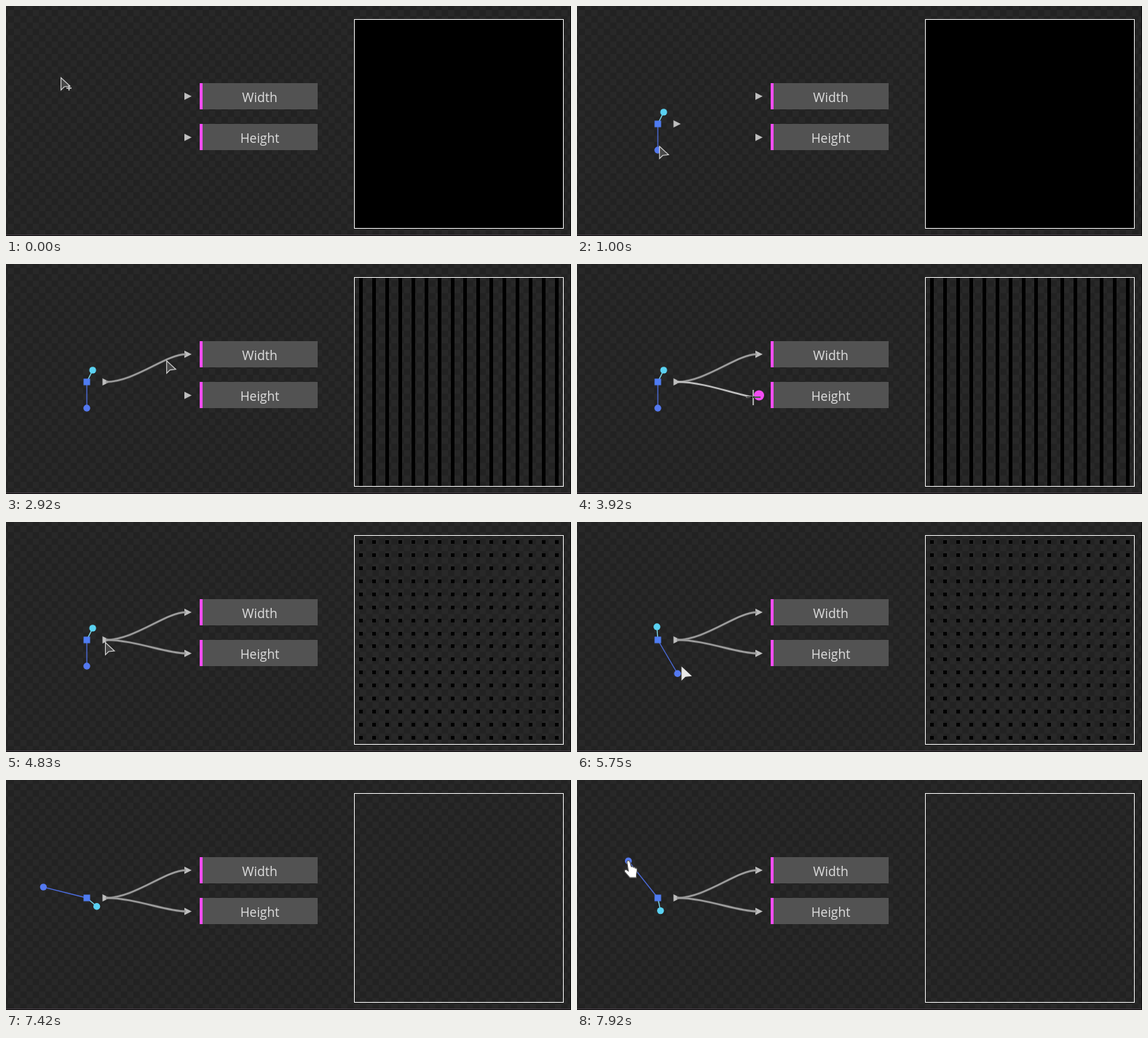
These frames come from a looping animation (776x316 px, 8 s). An HTML page with a canvas:

```html
<!DOCTYPE html>
<html lang="en">
<head>
<meta charset="utf-8">
<title>Node editor</title>
<style>
html, body { margin: 0; width: 100%; height: 100%; overflow: hidden; background: #252525; }
canvas { display: block; }
</style>
</head>
<body>
<canvas id="stage" width="776" height="316"></canvas>
<script>
const ctx = document.getElementById('stage').getContext('2d');
const LOOP = 8000, STEP = 1000 / 12;
const NODE = { x: 111, y: 162 }, OUT = { x: 137, y: 162 };
const INPUTS = [{ label: 'Width', y: 124 }, { label: 'Height', y: 180.5 }];
const BOX = { x: 479, y: 19, size: 287, cells: 16 };
const LINK_TIMES = [{ start: 2080, end: 2740 }, { start: 3560, end: 4060 }];
const CREATED = 420;

// Rows of [time, ...values], interpolated with a soft start and stop.
const CURSOR = [
  [80, 75, 98], [420, 111, 162], [750, 111, 198], [920, 111, 198], [1330, 129, 140],
  [1670, 165, 168], [1920, 154, 167], [2080, 138, 162], [2500, 243, 124], [2740, 243, 124],
  [3330, 137, 164], [3560, 138, 163], [3900, 242, 183], [4060, 243, 182],
  [4420, 215, 186], [4790, 136, 165], [4860, 136, 165], [5080, 111, 198]
];
const ANGLE = [
  [5330, 90], [5920, 52], [6420, -1], [6750, -26], [7420, -166], [7580, -177],
  [7670, -188], [7760, -186], [7840, -160], [7915, -128.5]
];
const LENGTH = [[420, 0], [750, 36], [5330, 36], [5920, 58], [6420, 61.5], [7420, 61.5], [7915, 65]];

function sample(keys, t) {
  if (t <= keys[0][0]) return keys[0].slice(1);
  const i = keys.findIndex(k => k[0] > t);
  if (i < 0) return keys[keys.length - 1].slice(1);
  const a = keys[i - 1], b = keys[i];
  const u = (t - a[0]) / (b[0] - a[0]), s = u * u * (3 - 2 * u);
  return a.slice(1).map((v, k) => v + (b[k + 1] - v) * s);
}

const polar = (deg, r) => ({
  x: NODE.x + r * Math.cos(deg * Math.PI / 180),
  y: NODE.y + r * Math.sin(deg * Math.PI / 180)
});

function rect(x, y, w, h, color) {
  ctx.fillStyle = color;
  ctx.fillRect(x, y, w, h);
}

function dot(p, r, color) {
  ctx.fillStyle = color;
  ctx.beginPath();
  ctx.arc(p.x, p.y, r, 0, 2 * Math.PI);
  ctx.fill();
}

function line(a, b, color, width = 1.3) {
  ctx.strokeStyle = color;
  ctx.lineWidth = width;
  ctx.beginPath();
  ctx.moveTo(a.x, a.y);
  ctx.lineTo(b.x, b.y);
  ctx.stroke();
}

function shape(path, fill, stroke) {
  const p = new Path2D(path);
  ctx.fillStyle = fill;
  ctx.fill(p);
  if (stroke) {
    ctx.strokeStyle = stroke;
    ctx.lineWidth = 1.1;
    ctx.stroke(p);
  }
}

function triangle(x, y) {
  shape(`M${x} ${y - 5}L${x + 10} ${y}L${x} ${y + 5}Z`, '#bebebe');
}

function makeChecker() {
  const tile = document.createElement('canvas');
  tile.width = tile.height = 16;
  const c = tile.getContext('2d');
  c.fillStyle = '#282828';
  c.fillRect(0, 0, 16, 16);
  c.fillStyle = '#222';
  c.fillRect(0, 0, 8, 8);
  c.fillRect(8, 8, 8, 8);
  const pattern = ctx.createPattern(tile, 'repeat');
  pattern.setTransform(new DOMMatrix().translate(2.2, 14).scale(1.08));
  return pattern;
}
const checker = makeChecker();

function drawPreview(t, angle) {
  const turn = ((angle + 180) % 360 + 360) % 360;
  const value = Math.round(turn * 0.02);
  const [cols, rows] = LINK_TIMES.map(l => t >= l.end ? BOX.cells : 1);
  const w = cols === 1 ? BOX.size : value, h = rows === 1 ? BOX.size : value;
  if (value > 1) {
    for (let r = 0; r < rows; r++)
      for (let c = 0; c < cols; c++)
        rect(Math.floor(BOX.x + (c + 0.5) * BOX.size / cols - w / 2),
             Math.floor(BOX.y + (r + 0.5) * BOX.size / rows - h / 2), w, h, '#000');
  }
  ctx.strokeStyle = '#f4f4f4';
  ctx.lineWidth = 1;
  ctx.strokeRect(BOX.x - 0.5, BOX.y - 0.5, BOX.size, BOX.size);
}

function drawInput({ label, y }) {
  const top = Math.floor(y) - 18;
  rect(266, top, 162, 36, '#525252');
  rect(266, top, 4, 36, '#f24cf2');
  triangle(245, y);
  ctx.fillStyle = '#dedede';
  ctx.font = '17.5px "Open Sans", "Noto Sans", sans-serif';
  ctx.textAlign = 'center';
  ctx.fillText(label, 348.5, Math.floor(y) + 7.5);
}

function drawLink(end, dragging) {
  const dx = end.x - OUT.x, dy = end.y - OUT.y;
  const trace = (color, width) => {
    ctx.strokeStyle = color;
    ctx.lineWidth = width;
    ctx.beginPath();
    ctx.moveTo(OUT.x, OUT.y);
    ctx.bezierCurveTo(OUT.x + dx * 0.36, OUT.y,
      end.x - dx * 0.25, end.y - (dragging ? dy * 0.2 : 0), end.x, end.y);
    ctx.stroke();
  };
  trace(dragging ? '#8886' : '#7779', 3.4);
  trace(dragging ? '#c8c8c8' : '#a2a2a2', 1.9);
}

function drawLinks(t, pointer) {
  LINK_TIMES.forEach(({ start, end }, i) => {
    const target = { x: 250, y: INPUTS[i].y };
    if (t >= end) {
      drawLink({ x: 247, y: target.y });
    } else if (t >= start) {
      if (Math.hypot(pointer.x - target.x, pointer.y - target.y) < 12) dot(target, 7, '#f24cf2');
      drawLink(pointer, true);
    }
  });
}

function drawNode(t, angle, length) {
  const handle = polar(angle, length), twist = polar(angle - 153.4, 18);
  if (t > 920) {
    line(NODE, twist, '#7fd9ea');
    dot(twist, 4.7, '#5ad2f2');
  }
  line(NODE, handle, '#4c6cde');
  dot(handle, 4.7, '#5479f0');
  rect(NODE.x - 4.5, NODE.y - 4.5, 9, 9, '#4f7cf2');
  return handle;
}

function drawCursor(kind, { x, y }) {
  ctx.save();
  ctx.translate(x, y);
  if (kind === 'cross') {
    ctx.globalCompositeOperation = 'difference';
    rect(-1, -10, 2, 21, '#d0d0d0');
    rect(-10, -1, 20, 2, '#a8a8a8');
  } else if (kind === 'hand') {
    shape('M-2 1Q0 -2 2 1L4 8Q6 7 7 9Q9 8 9.5 10Q12 9 12 13L11 19V23H2L-5 15Q-6 12 -3 12L0 14Z', '#fff', '#555');
  } else {
    const solid = kind === 'drag';
    shape('M.5 .5V17.5L5 13L13 12Z', solid ? '#e8e8e8' : '#484848', solid ? '#e8e8e8' : '#d4d4d4');
    if (kind === 'add') {
      rect(8, 14, 7, 1.5, '#d8d8d8');
      rect(10.8, 11.2, 1.5, 7, '#d8d8d8');
    }
  }
  ctx.restore();
}

function cursorKind(t) {
  if (t < CREATED) return 'add';
  if (LINK_TIMES.some(l => t >= l.start && t < l.end)) return 'cross';
  if (t < 5000) return 'arrow';
  if (t < 5330) return 'hand';
  if (t < 6560) return 'drag';
  return t < 7870 ? null : 'hand';
}

function draw(t) {
  const [x, y] = sample(CURSOR, t), [angle] = sample(ANGLE, t), [length] = sample(LENGTH, t);
  let pointer = { x, y };
  rect(0, 0, 776, 316, checker);
  rect(0, 314, 776, 1, '#453c45');
  rect(0, 315, 776, 1, '#0c0c0c');
  rect(775, 0, 1, 316, '#0c0c0c');
  drawPreview(t, angle);
  INPUTS.forEach(drawInput);
  if (t >= CREATED) {
    triangle(132.5, OUT.y);
    drawLinks(t, pointer);
    const handle = drawNode(t, angle, length);
    if (t >= 5330) pointer = t < 7000 ? { x: handle.x + 5.5, y: handle.y - 9 } : handle;
  }
  const kind = cursorKind(t);
  if (kind) drawCursor(kind, pointer);
}

function frame() {
  const t = performance.now() % LOOP;
  draw(Math.floor((t + 10) / STEP) * STEP % LOOP);
  requestAnimationFrame(frame);
}
frame();
</script>
</body>
</html>
```
